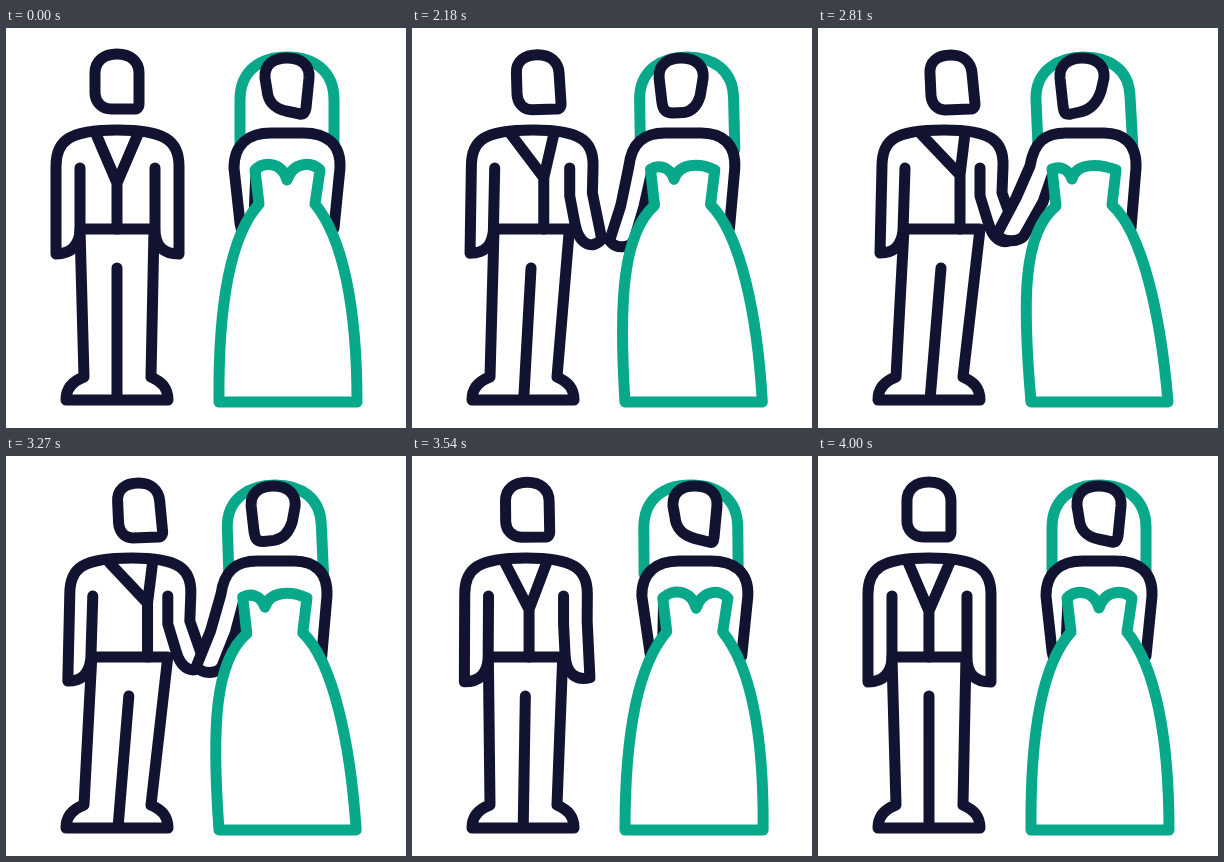
Write an HTML page that moves like this. It is 400x400 px and loops after 4.06 s.

```html
<!DOCTYPE html>
<html lang="en">
<head>
<meta charset="utf-8">
<title>Wedding couple</title>
<style>
  html, body { margin: 0; width: 100%; height: 100%; overflow: hidden; background: #fff; }
  svg { display: block; width: 100vw; height: 100vh; }
  path { stroke-width: 11; stroke-linecap: round; stroke-linejoin: round; }
</style>
</head>
<body>
<svg id="stage" viewBox="0 0 400 400"></svg>
<script>
const LOOP = 4060, START = 2030, STEP = 30;
const NAVY = '#121331', TEAL = '#08a88a';

// Progress of each part from standing (0) to leaning together (1): [ms, value]
const tracks = {
  groom: [[2030, 0], [2180, .67], [2400, .97], [2540, 1], [3200, 1], [3270, .98],
          [3540, .17], [3660, -.08], [3750, -.1], [4000, 0]],
  bride: [[2000, 0], [2030, .04], [2180, .7], [2360, .93], [2570, .97], [2810, 1],
          [3090, .97], [3270, .8], [3420, .2], [3540, -.12], [3660, -.09], [4000, 0]],
  veil:  [[2000, 0], [2030, .04], [2180, .4], [2400, .9], [2810, 1], [3090, .95],
          [3270, .78], [3540, .12], [3700, -.08], [4000, 0]]
};

// Back to front; both poses of a part share the same path commands
const parts = [
  { track: 'groom', color: NAVY,
    rest: 'M78 349 L74 201 L148 201 L145 349 C156 354 162 360 162 372 L60 372 C60 360 67 353 78 349 M111 240 L111 372',
    lean: 'M78 349 L86 201 L162 201 L145 349 C156 354 162 360 162 372 L60 372 C60 360 67 353 78 349 M123 240 L112 372' },
  { track: 'groom', color: NAVY,
    rest: 'M74 140 L74 203 C73 217 66 226 50 226 L50 138 C50 112 64 102 111 102 C158 102 173 112 173 138 L173 165 L173 226 C158 226 149 219 149 201 L149 168 L149 140',
    lean: 'M87 140 L85 203 C83 218 76 225 62 225 L64 138 C64 112 76 102 126 102 C172 102 186 112 185 138 L184 165 L198 204 C192 220 176 216 170 194 L162 168 L162 140' },
  { track: 'groom', color: NAVY,
    rest: 'M90 106 L111 155 L132 106 M111 155 L111 201',
    lean: 'M103 106 L142 147 L147 105 M142 147 L142 201' },
  { track: 'groom', color: NAVY,
    rest: 'M105 81 L128 81 Q133 81 133 76 L133 45 C133 33 124 26 111 26 C98 26 89 33 89 45 L89 65 C89 74 96 81 105 81 Z',
    lean: 'M127 82 L152 81 Q157 81 157 76 L154 45 C153 34 145 27 133 27 C119 27 111 34 112 46 L113 68 C114 76 119 82 127 82 Z' },
  { track: 'veil', color: TEAL,
    rest: 'M234 118 L234 72 C234 42 255 29 281 29 C307 29 328 42 328 72 L328 122',
    lean: 'M220 118 L218 72 C217 42 241 29 266 29 C292 29 311 42 312 68 L315 122' },
  { track: 'bride', color: NAVY, fill: '#fff',
    rest: 'M250 142 L248 190 L258 224 C256 234 246 236 241 228 L234 195 L228 140 C228 116 243 105 265 105 L297 105 C321 105 335 116 334 140 L328 200',
    lean: 'M236 142 L225 174 L207 206 C203 215 184 215 179 206 L198 170 L212 138 C216 114 227 105 248 105 L286 105 C306 105 319 116 318 140 L313 200' },
  { track: 'bride', color: NAVY, fill: '#fff',
    rest: 'M294 86 L280 83 C268 80 262 74 261 62 L259 50 C258 36 268 30 281 30 C295 30 304 37 303 50 L300 80 Q299 87 294 86 Z',
    lean: 'M262 84 L253 86 C246 87 246 84 245 78 L242 50 C241 37 251 30 264 30 C279 30 287 38 286 50 L283 63 Q277 81 262 84 Z' },
  { track: 'bride', color: TEAL, fill: '#fff',
    rest: 'M253 176 L249 142 C258 133 276 134 281 152 C287 134 305 133 314 142 L309 176 C337 210 351 280 351 374 L213 374 C212 270 226 206 253 176 Z',
    lean: 'M238 178 L234 141 C241 138 250 140 254 151 C258 135 280 135 298 142 L294 177 C325 205 343 290 350 374 L213 374 C204 270 205 205 238 178 Z' }
];

const stage = document.getElementById('stage');
for (const part of parts) {
  part.node = document.createElementNS('http://www.w3.org/2000/svg', 'path');
  part.node.setAttribute('stroke', part.color);
  part.node.setAttribute('fill', part.fill || 'none');
  stage.append(part.node);
  part.leanValues = part.lean.match(/\d+/g).map(Number);
}

function morph({ rest, leanValues }, amount) {
  let i = 0;
  return rest.replace(/\d+/g, n => (+n + (leanValues[i++] - n) * amount).toFixed(2));
}

// Monotone cubic interpolation, flat at turning points
function valueAt(keys, time) {
  const last = keys.length - 1;
  if (time <= keys[0][0]) return keys[0][1];
  if (time >= keys[last][0]) return keys[last][1];
  const i = keys.findIndex(key => key[0] > time) - 1;
  const secant = k => (keys[k + 1][1] - keys[k][1]) / (keys[k + 1][0] - keys[k][0]);
  const slope = k => {
    if (k === 0 || k === last) return 0;
    const a = secant(k - 1), b = secant(k);
    return a * b > 0 ? 2 * a * b / (a + b) : 0;
  };
  const [t0, v0] = keys[i], [t1, v1] = keys[i + 1];
  const span = t1 - t0, u = (time - t0) / span, w = 1 - u;
  return v0 * w * w * (1 + 2 * u) + v1 * u * u * (3 - 2 * u)
    + span * u * w * (slope(i) * w - slope(i + 1) * u);
}

function render(ms) {
  const t = ms % LOOP;
  const time = t < START ? 0 : START + Math.floor((t - START) / STEP) * STEP;
  for (const part of parts) {
    part.node.setAttribute('d', morph(part, valueAt(tracks[part.track], time)));
  }
}

const begin = performance.now();
function tick() {
  render(performance.now() - begin);
  requestAnimationFrame(tick);
}
tick();
</script>
</body>
</html>
```
